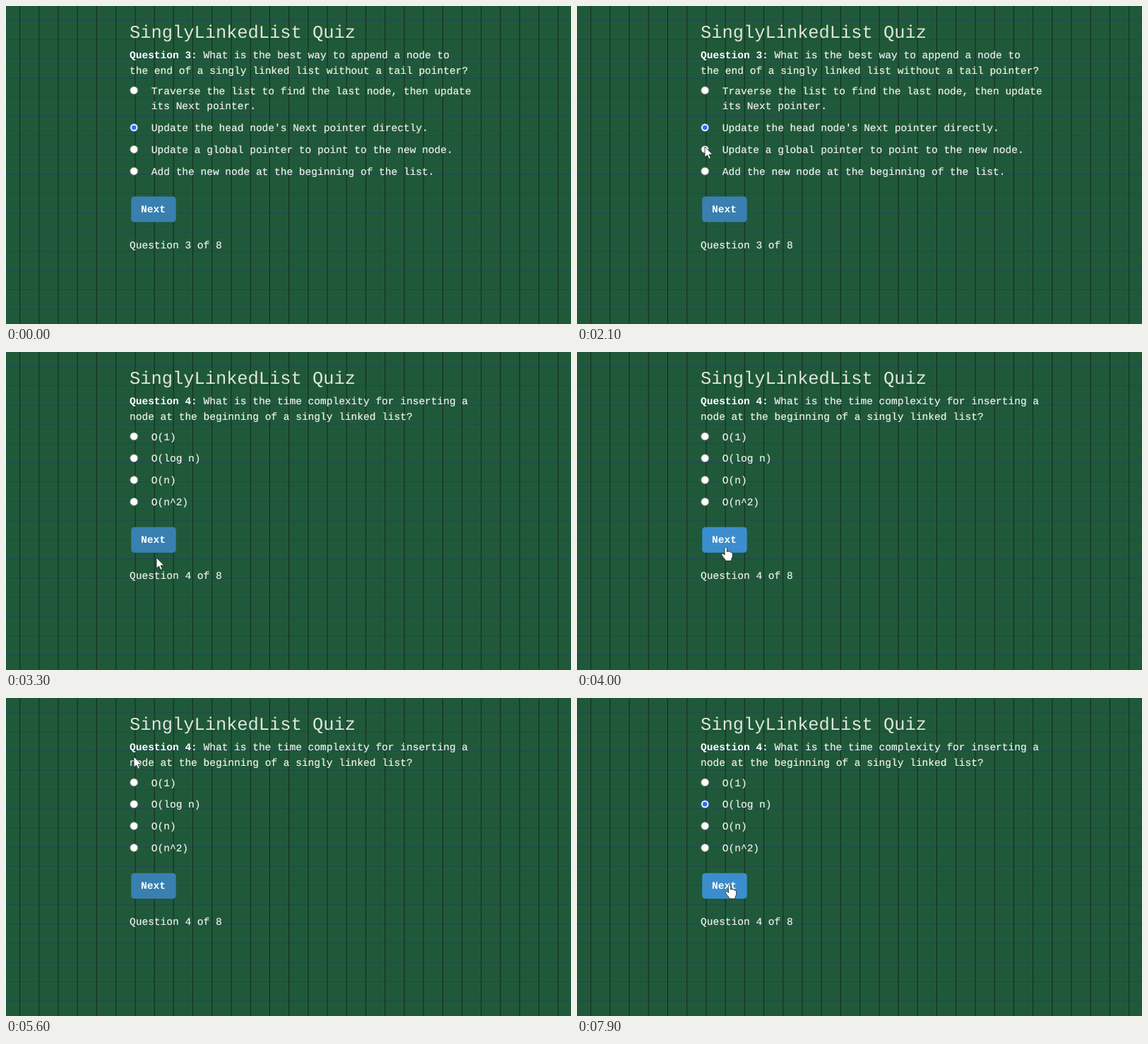
An HTML page for the animation above (8000 ms loop, 800 px wide and 450 px high).

```html
<!DOCTYPE html>
<html lang="en">
<head>
<meta charset="utf-8">
<title>Quiz</title>
<style>
  html, body { margin: 0; width: 100%; height: 100%; overflow: hidden; background: #20593a; }
  svg { display: block; width: 800px; height: 450px; }
  text {
    font: 14.52px "Courier New", "Liberation Mono", monospace;
    fill: #f0f2ea; white-space: pre; text-rendering: geometricPrecision;
  }
  .body { stroke: #f0f2ea; stroke-width: .2px; }
  .title { font-size: 25.4px; fill: #dfe6dc; }
  .bold { font-weight: bold; fill: #fff; }
  .pointer { fill: #fff; stroke: #16251c; stroke-width: .8px; stroke-linejoin: round; }
</style>
</head>
<body>
<svg id="stage" viewBox="0 0 800 450"></svg>
<script>
const LEFT = 175, LINE = 21.78, ROW = 30.85, CELL = 27.22;
const BUTTON = { x: 177.2, width: 63.5, height: 36.2, rx: 4.5 };
const stage = document.getElementById('stage');

function add(parent, tag, attrs, content = '') {
  const el = document.createElementNS('http://www.w3.org/2000/svg', tag);
  for (const key in attrs) el.setAttribute(key, attrs[key]);
  el.textContent = content;
  return parent.appendChild(el);
}
const text = (parent, x, y, content, cls = 'body') =>
  add(parent, 'text', { x, y, class: cls }, content);
const show = (el, on) => el.setAttribute('display', on ? '' : 'none');

// Ruled background
for (let y = 19.8; y < 450; y += CELL)
  add(stage, 'rect', { x: 0, y, width: 800, height: 1.1, fill: '#1e4a55' });
for (let x = 19; x < 800; x += CELL)
  add(stage, 'rect', { x, y: 0, width: 1.1, height: 450, fill: '#142e20' });

text(stage, LEFT, 45, 'SinglyLinkedList Quiz', 'title');

function makePage(number, question, options) {
  const group = add(stage, 'g', {});
  text(group, LEFT, 74.2, `Question ${number}:`, 'bold');
  text(group, 279.5, 74.2, question[0]);
  text(group, LEFT, 74.2 + LINE, question[1]);

  let y = 119.4;
  const radios = options.map(option => {
    const center = { cx: 181.2, cy: y };
    const ring = add(group, 'circle', { ...center, r: 5.5, fill: '#fff' });
    const dot = add(group, 'circle', { ...center, r: 3.3 });
    const radio = { y, ring, dot };
    const lines = option.split('\n');
    lines.forEach((line, i) => text(group, 205.8, y + 5.2 + i * LINE, line));
    y += ROW + (lines.length - 1) * LINE;
    return radio;
  });

  const top = y + 5;
  const button = add(group, 'rect', { ...BUTTON, y: top });
  text(group, 191, top + 22.5, 'Next', 'bold');
  text(group, LEFT, top + 73, `Question ${number} of 8`);
  return { group, radios, button, top };
}

const pages = [
  makePage(3,
    ['What is the best way to append a node to',
     'the end of a singly linked list without a tail pointer?'],
    ['Traverse the list to find the last node, then update\nits Next pointer.',
     "Update the head node's Next pointer directly.",
     'Update a global pointer to point to the new node.',
     'Add the new node at the beginning of the list.']),
  makePage(4,
    ['What is the time complexity for inserting a',
     'node at the beginning of a singly linked list?'],
    ['O(1)', 'O(log n)', 'O(n)', 'O(n^2)'])
];

const arrow = add(stage, 'path', {
  class: 'pointer', d: 'M0 0V15.2L3.5 12L6 17.4L8.4 16.3L6 11.1H10.8Z'
});
const hand = add(stage, 'path', {
  class: 'pointer',
  d: 'M-1.6 1.4Q0 -.8 1.6 1.4V7Q6 5.5 7.2 8Q9.6 7.6 9.6 10V14L8 18V20H-.6V18.4' +
     'Q-3.8 15 -5.8 11.4Q-6 9 -3.7 9.6L-1.6 11.8Z'
});

// Each move eases the pointer from wherever it is to a new spot.
const enter = { at: 1300, x: 5, y: 228 };
const moves = [
  { from: 1300, to: 1800, x: 181, y: 199 },
  { from: 2300, to: 2700, x: 214, y: 301 },
  { from: 3000, to: 3300, x: 213, y: 291 },
  { from: 3900, to: 4500, x: 181, y: 83 },
  { from: 5700, to: 6500, x: 181, y: 150 },
  { from: 6900, to: 7600, x: 216, y: 264 }
];

function pointerAt(t) {
  let { x, y } = enter;
  for (const m of moves) {
    const u = Math.min(1, Math.max(0, (t - m.from) / (m.to - m.from)));
    const eased = u * u * (3 - 2 * u);
    x += (m.x - x) * eased;
    y += (m.y - y) * eased;
  }
  return { x, y };
}

function draw(t) {
  const current = t < 3000 ? 0 : 1;
  const chosen = current ? (t < 6700 ? -1 : 1) : (t < 2200 ? 1 : 2);
  const page = pages[current];
  const visible = t >= enter.at;
  const { x, y } = pointerAt(t);
  const over = visible && x > BUTTON.x && x < BUTTON.x + BUTTON.width &&
    y > page.top && y < page.top + BUTTON.height;

  pages.forEach(p => show(p.group, p === page));
  page.radios.forEach((radio, i) => {
    const hover = Math.hypot(x - 181, y - radio.y) < 6;
    const blue = hover ? '#2259bd' : '#2f6de8';
    radio.ring.setAttribute('stroke', i === chosen ? blue : hover ? '#4c4c4c' : '#7d827d');
    radio.dot.setAttribute('fill', i === chosen ? blue : 'none');
  });
  page.button.setAttribute('fill', over ? '#3b8dcd' : '#397fb0');

  show(arrow, visible && !over);
  show(hand, over);
  for (const el of [arrow, hand]) el.setAttribute('transform', `translate(${x} ${y})`);
}

const start = performance.now();
function tick() {
  const t = (performance.now() - start) % 8000;
  draw(Math.floor(t / 100) * 100);
  requestAnimationFrame(tick);
}
tick();
</script>
</body>
</html>
```
